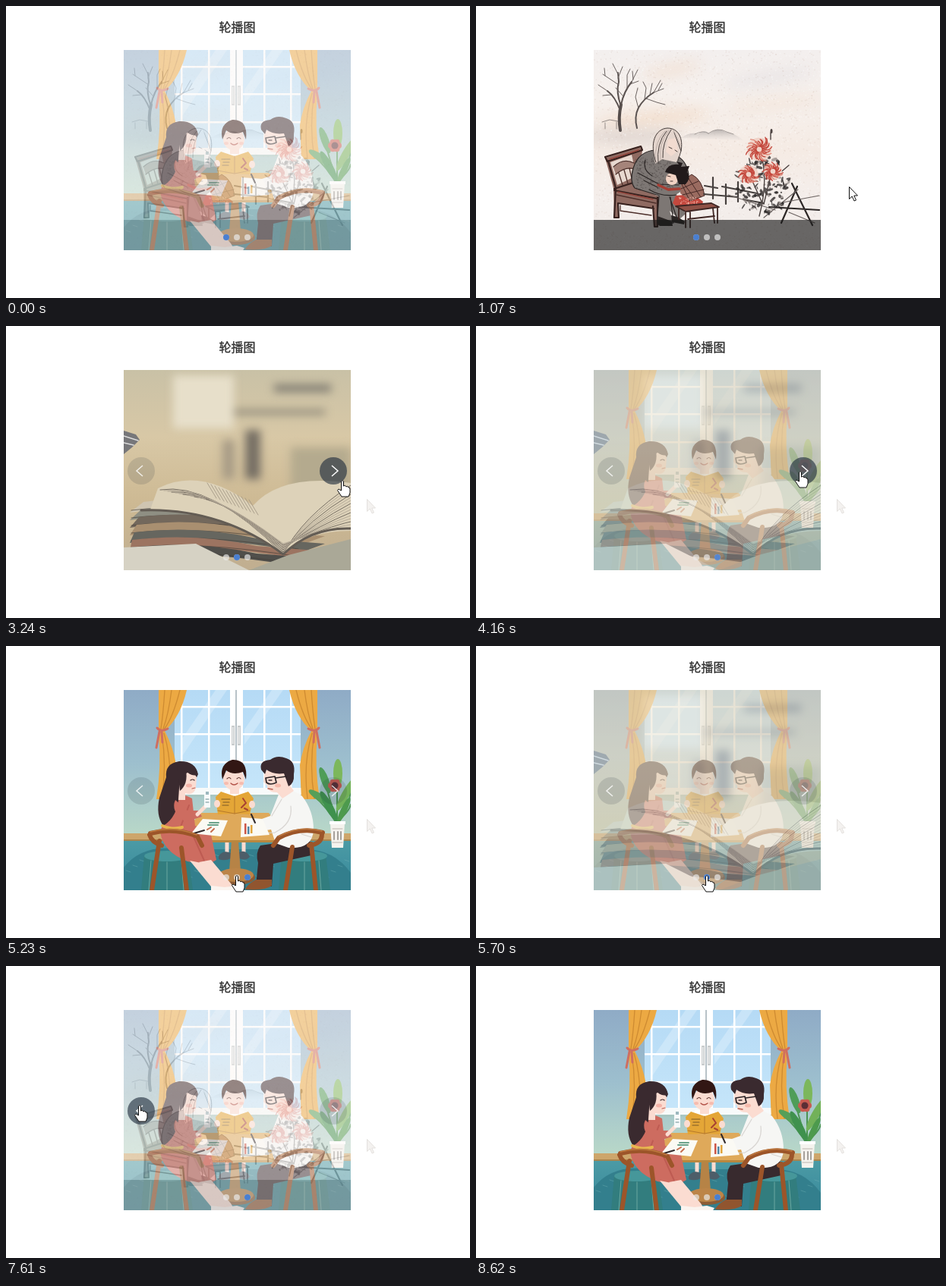
Animation, 611 px wide and 385 px high, one loop 9.32 s. Source, as an HTML page with a canvas:

```html
<!DOCTYPE html>
<html lang="zh-CN">
<head>
<meta charset="utf-8">
<title>轮播图</title>
<style>
html, body { margin: 0; width: 100%; height: 100%; overflow: hidden; background: #fff; }
canvas { position: absolute; left: 0; top: 0; }
h1 { position: absolute; left: 0; top: 15px; width: 609px; margin: 0; text-align: center;
  font: 500 16px/24px "Noto Sans CJK SC", "Noto Sans CJK", sans-serif; color: #333; -webkit-text-stroke: .35px #333; }
</style>
</head>
<body>
<canvas id="stage" width="611" height="385"></canvas>
<h1>轮播图</h1>
<script>
const LOOP = 9320, FADE = 500;
const BOX = { x: 155, y: 58, w: 299, h: 264 };
const ctx = document.getElementById('stage').getContext('2d');

function seeded(seed) {
  return () => (seed = (seed * 16807) % 2147483647) / 2147483647;
}

// Builds one slide; painters work in stage coordinates.
function makeSlide(paint) {
  const canvas = document.createElement('canvas');
  canvas.width = BOX.w;
  canvas.height = BOX.h;
  const c = canvas.getContext('2d');
  c.translate(-BOX.x, -BOX.y);
  c.lineCap = c.lineJoin = 'round';
  paint({
    c,
    fill(color, d) { c.fillStyle = color; c.fill(new Path2D(d)); },
    line(color, width, d) { c.strokeStyle = color; c.lineWidth = width; c.stroke(new Path2D(d)); },
    rect(color, x, y, w, h) { c.fillStyle = color; c.fillRect(x, y, w, h); },
    oval(color, x, y, rx, ry = rx, turn = 0) {
      c.fillStyle = color;
      c.beginPath();
      c.ellipse(x, y, rx, ry, turn, 0, 7);
      c.fill();
    },
    fade(y0, y1, ...colors) {
      const g = c.createLinearGradient(0, y0, 0, y1);
      colors.forEach((color, i) => g.addColorStop(i / (colors.length - 1), color));
      return g;
    }
  });
  return canvas;
}

function paintInk({ c, fill, line, rect, oval, fade }) {
  const rnd = seeded(17), ink = '#2a2524';
  rect(fade(58, 322, '#f3efee', '#f6f0ec', '#f5ebe4', '#f4eeeb', '#f1ebe8'), 155, 58, 299, 264);
  c.filter = 'blur(9px)';
  oval('rgba(240,208,180,.5)', 235, 148, 75, 9, -.1);
  oval('rgba(240,212,190,.5)', 258, 84, 40, 7, -.2);
  oval('rgba(240,215,195,.45)', 395, 128, 65, 6, -.1);
  oval('rgba(226,222,226,.6)', 385, 95, 60, 8, -.15);
  oval('rgba(205,196,192,.6)', 205, 172, 65, 8);
  c.filter = 'none';
  for (let i = 0; i < 2600; i++) {
    rect(i % 2 ? 'rgba(170,140,125,.12)' : 'rgba(255,255,255,.35)', 155 + rnd() * 299, 58 + rnd() * 264, 1.5, 1.5);
  }
  // hills
  fill(fade(161, 180, '#aaa4a2', 'rgba(235,228,224,0)'), 'M270 174Q283 165 292 169Q301 162 307 168Q318 159 328 166Q340 167 352 177Z');
  line('#a39c99', 1, 'M288 169Q300 163 306 168M306 168Q318 159 330 166L339 169');
  line('#958c88', 1, 'M166 153L176 150L187 152M170 154V162M185 153V162');
  // bare trees
  line('#544c4a', 4, 'M190 164Q187 147 191 130');
  line('#5a5250', 2, 'M191 132Q184 113 188 100L187 88M190 138Q183 119 173 112M191 130Q195 112 205 100M212 161Q208 146 214 134Q221 122 234 114');
  line('#6b6361', 1, 'M187 90L180 76M187 95L193 80M188 104L176 96L167 90M173 112L161 104M178 117L167 118M205 100L213 84M199 109V91L203 83M203 103L214 99M194 119L184 108M170 92L169 82M207 97L206 86');
  line('#6b6361', 1, 'M214 135L210 120L213 108M222 123L224 108L220 100M234 114L243 98M234 114L247 109M224 122L238 127L249 130M229 117L232 102M240 111L245 102');
  // chair
  fill('#8f6a61', 'M170 200L215 185L219 191L212 237L242 252L240 291L235 291L233 267L188 261L188 280L182 280L181 240Z');
  fill('#e8d9d0', 'M177 206L205 196L211 224L186 236Z');
  fill('#a5847a', 'M181 213Q192 201 208 207L209 215Q194 211 184 222Z');
  line('#37211e', 2.2, 'M170 199L217 185L219 190L173 205ZM174 204L184 240L182 279L188 279L187 260M182 241L210 232M182 243L239 254M187 260L234 267M239 252V291H235L233 264');
  line('#4d302b', 1.3, 'M181 212Q194 200 208 207M184 222Q197 211 209 215M188 220L193 236M195 216L200 234M202 214L206 231M185 249L237 260M190 263V270L231 276');
  line('#96463d', 1.4, 'M187 245L233 255M176 202L214 190');
  // grandmother
  fill('#7d7774', 'M237 190Q214 191 207 214Q202 231 209 240L241 250L239 278L249 288L260 286L255 270L268 281L276 274L263 249L280 238Q284 208 263 197Z');
  for (let i = 0; i < 260; i++) oval('rgba(45,40,40,.28)', 210 + rnd() * 50, 200 + rnd() * 43, .8);
  line(ink, 1.2, 'M237 190Q214 191 207 214Q202 231 209 240L241 250L239 278L249 288L260 286L256 252M213 220L241 235L267 236M223 203Q219 216 232 224M263 197Q277 203 280 222M228 242Q244 252 264 249M255 252L264 278M221 230L239 239');
  fill(ink, 'M239 277Q236 288 242 290L259 290L258 284Z');
  fill(ink, 'M257 276L265 278L275 284L274 288L258 285Z');
  fill('#e4d5cd', 'M234 196C230 178 234 163 251 161C268 160 273 174 270 190L264 206L245 202L236 208Z');
  fill('#f2dbd0', 'M253 176L263 174L266 191L257 198L250 192Z');
  line('#443c3a', 1, 'M237 206C228 181 236 162 252 161C267 161 273 175 270 191L266 204M251 165Q237 181 240 208M257 163Q245 180 246 200M261 167L270 191M254 186L258 188M262 190L265 192');
  line('#a89b95', .7, 'M249 165Q234 180 237 202M254 164Q240 181 243 204M260 164L269 184');
  // child on the stool
  fill('#c4483e', 'M263 250L286 248L299 258L297 264L266 266L259 260Z');
  fill('#9a6b60', 'M270 232L284 222Q298 229 301 250L282 257L269 247Z');
  line('#472a27', 1, 'M272 232L289 255M279 226L296 252M270 241L293 231M272 249L300 242M270 232L284 222Q298 229 301 250L282 257Z');
  for (let i = 0; i < 40; i++) oval('rgba(245,190,175,.7)', 265 + rnd() * 27, 252 + rnd() * 10, .8);
  oval('#f2d3c4', 258, 228, 8, 8);
  fill('#211a1b', 'M249 219Q253 207 267 209L264 205L272 207L270 212L281 211L278 219Q284 226 276 235L267 235L263 223Z');
  line('#43312e', 1, 'M252 224L256 225M256 231L259 231');
  line('#a63e34', 3.5, 'M240 236L253 242L268 241');
  fill('#8f5146', 'M263 264L310 260L320 265L276 271Z');
  line('#3f2623', 1.8, 'M263 264L310 260L320 265L276 271ZM276 271V292M282 272V292M312 267L314 286M318 266V286M267 266V282M279 281L314 277');
  // fence
  line('#46403e', 2.2, 'M301 237L318 240M324 238L370 247M300 248L345 252M312 226V254M329 235V261M345 232V258M352 255L379 260');
  line('#2c2726', 2.2, 'M416 234L443 289M423 238L402 286M386 265L452 269');
  line('#6b6361', 1.2, 'M379 279L424 242M404 259L452 250M332 249L394 269M412 272L446 286');
  // leaves and blossoms
  for (let i = 0; i < 150; i++) {
    const a = rnd() * 6.3, r = Math.sqrt(rnd());
    oval(i % 3 ? 'rgba(40,36,36,.75)' : 'rgba(120,112,109,.6)', 377 + Math.cos(a) * 36 * r, 236 + Math.sin(a) * 40 * r,
      1 + rnd() * 3.4, .6 + rnd() * 1.6, rnd() * 3);
  }
  line('#4b4240', 1.4, 'M374 191Q386 227 373 277M360 222L377 260M390 216L379 261M388 176L388 167M398 222L412 210');
  oval('#4b4240', 389, 165, 1.5, 3);
  for (const [x, y, rx, ry] of [[373, 189, 19, 18], [359, 222, 15, 14], [391, 218, 14, 13]]) {
    oval('#f0d3c8', x, y, rx * .85, ry * .85);
    for (let i = 0; i < 34; i++) {
      const a = i * 2.4, s = .5 + rnd() * .5, bend = a + .5;
      line(i % 4 ? '#c3463b' : '#dd8474', 1.3,
        `M${x + Math.cos(a) * 4} ${y + Math.sin(a) * 4}Q${x + Math.cos(bend) * rx * s * .8} ${y + Math.sin(bend) * ry * s * .8} ${x + Math.cos(a) * rx * s} ${y + Math.sin(a) * ry * s}`);
    }
  }
  rect('rgba(25,25,25,.63)', 155, 282, 299, 40);
}

function paintBooks({ c, fill, line, rect, oval, fade }) {
  rect(fade(58, 322, '#c9c1a6', '#d8c8a6', '#cdb993', '#c0ae90'), 155, 58, 299, 264);
  c.filter = 'blur(6px)';
  rect('#817d72', 353, 77, 75, 10);
  rect('#908a7a', 285, 110, 135, 7);
  rect('#766f64', 315, 137, 20, 65);
  rect('#a79b85', 285, 150, 16, 52);
  rect('#e7dfca', 220, 65, 80, 70);
  rect('#b4aa8e', 375, 160, 79, 60);
  c.filter = 'none';
  fill('#77777a', 'M155 138L171 143L176 150L166 160L155 169Z');
  line('#ddd', 1.5, 'M155 145L174 151M155 154L168 157');
  // stacked volumes
  const layers = ['#cfc5b1', '#8f8f83', '#73685c', '#a98f70', '#66665f', '#9c7461', '#504f4b'];
  layers.forEach((color, i) => {
    const y = 232 + i * 10;
    fill(color, `M${181 - i * 3} ${y}Q250 ${y - 10} 330 ${y + 8}L420 ${y + 15}L390 ${y + 26}Q250 ${y + 1} 163 ${y + 14}Z`);
    line('rgba(65,60,55,.65)', 1, `M165 ${y + 11}Q250 ${y} 385 ${y + 22}`);
  });
  // open pages
  fill('#ddd2b9', 'M200 214Q258 185 325 237Q363 194 454 207V270Q393 270 365 302Q289 245 190 242Z');
  for (let i = 0; i < 15; i++) {
    line(i % 3 ? '#b5aa98' : '#756d62', 1,
      `M${203 + i * 5} ${216 + i}Q${270 + i * 3} ${205 + i * 3} 365 ${301 - i}Q${390 + i * 3} ${252 + i} 454 ${210 + i * 4}`);
  }
  line('#635c54', 3, 'M178 243Q282 239 365 301Q402 265 454 267');
  for (let i = 0; i < 12; i++) line('#9f9482', .8, `M${265 + i * 5} ${207 + i * 2}l12 20`);
  fill('#d6d2c4', 'M155 292L250 287L320 322H155Z');
  fill('#aaa897', 'M320 322L372 302L454 281V322Z');
}

function paintFamily({ c, fill, line, rect, oval, fade }) {
  const hair = '#3a2a2f', skin = '#fbdcd1', wood = '#9c5529';
  rect(fade(58, 250, '#8fabc6', '#9dbfce', '#b9d8c8'), 155, 58, 299, 192);
  rect('#cda66b', 155, 247, 299, 9);
  rect('#a9854e', 155, 255, 299, 2);
  rect(fade(257, 322, '#4b9aa5', '#38899a'), 155, 257, 299, 65);
  fill('#337f8d', 'M155 292Q180 260 230 268L390 268Q430 266 454 299V322H155Z');
  for (let x = 158; x < 454; x += 9) line('rgba(120,185,187,.35)', 1, `M${x} ${275 + x % 5 * 7}l6 2`);
  // window
  rect(fade(58, 195, '#b5daf5', '#c6e6fa'), 222, 58, 166, 137);
  fill('rgba(255,255,255,.25)', 'M276 58H291L232 145V122Z');
  fill('rgba(255,255,255,.25)', 'M350 58H365L314 130V110Z');
  for (const x of [230, 266, 339, 374]) rect('#fff', x, 58, 2.5, 135);
  for (const y of [79, 115, 152]) rect('#fff', 222, y, 166, 2.5);
  rect('#fff', 295, 58, 17, 137);
  rect('#b8c2c8', 302, 58, 2, 137);
  for (const x of [297, 305]) {
    rect('#c9cccd', x, 105, 4, 26);
    rect('#eceeee', x + 1, 107, 1.5, 22);
  }
  rect('#f7fafa', 216, 187, 178, 9);
  rect('#a8c7c2', 216, 196, 178, 3);
  // curtains, the right one mirrored
  for (const side of [1, -1]) {
    c.save();
    if (side < 0) { c.translate(611, 0); c.scale(-1, 1); }
    fill('#eca943', 'M201 58H238Q230 93 209 112Q221 135 224 157L222 202H198Q205 158 201 116Z');
    line('#ce8b32', 1.3, 'M209 58Q207 90 204 109M218 58Q214 90 207 109M229 58Q220 94 208 110M205 115Q212 158 205 201M208 115Q220 155 214 201');
    line('#cf6e60', 3, 'M199 108Q204 114 213 109M202 113L198 134M205 113L206 127');
    c.restore();
  }
  // plant
  line('#4b9453', 2, 'M436 236V164M436 235Q421 211 407 199M437 235Q452 210 454 190M436 235Q421 184 418 171M437 231Q452 218 454 209');
  for (const [x, y, rx, ry, turn, color] of [
    [437, 168, 6, 19, 0, '#7cb75b'], [420, 177, 5, 18, -.35, '#4f9d58'], [447, 196, 5, 24, .5, '#72b159'],
    [414, 200, 5, 18, -1, '#569f58'], [425, 211, 5, 22, -.5, '#3f914e'], [445, 216, 4, 18, .45, '#4d9a4d']
  ]) oval(color, x, y, rx, ry, turn);
  for (let i = 0; i < 6; i++) oval('#c85c51', 433 + Math.cos(i * 1.05) * 5, 184 + Math.sin(i * 1.05) * 5, 4);
  oval('#5b2e35', 433, 184, 4.5);
  fill('#f5f3ee', 'M427 233H446L444 266H429Z');
  rect('#fff', 426, 231, 21, 4);
  line('#bbb4ad', 1, 'M430 241H443M430 259H443');
  line('#a5a19b', 2, 'M432 245V255M437 245V255M441 245V255');
  // stools
  for (const x of [212, 393]) {
    fill('#327d7e', `M${x - 30} 276L${x - 34} 322H${x + 34}L${x + 28} 276Z`);
    oval('#46979a', x, 277, 30, 7);
    line('#6ba8a0', 1, `M${x - 21} 283L${x - 24} 322M${x + 19} 283L${x + 22} 322M${x} 285V322`);
  }
  // boy
  fill('#fff', 'M281 199L289 190H312L323 199L319 242H282Z');
  fill(skin, 'M295 184H307V195H295Z');
  oval(skin, 300, 176, 14, 14);
  fill('#321714', 'M285 176Q281 159 293 152L298 150Q319 149 316 176L312 166Q299 171 290 164Z');
  line('#5c322d', 1.1, 'M291 175Q294 172 296 175M304 175Q307 172 309 175');
  line('#b4544a', 1.4, 'M296 181Q300 185 305 181');
  oval('rgba(240,140,125,.4)', 290, 181, 3, 2);
  oval('rgba(240,140,125,.4)', 310, 181, 3, 2);
  // table and the boy's feet
  line(skin, 5, 'M291 258V271M313 258V271');
  fill('#4d5e69', 'M280 277Q286 268 296 273V280Q288 284 280 281Z');
  fill('#4d5e69', 'M307 272Q316 268 321 278Q316 284 307 280Z');
  fill('#b68346', 'M297 257H306L309 297H294Z');
  oval('#8d5c35', 303, 305, 25, 10);
  oval('#bc8548', 303, 302, 23, 9);
  fill('#dfa95a', 'M256 220H346L373 254V259H228V254Z');
  rect('#b9873f', 228, 256, 145, 3);
  fill('#e4a637', 'M276 199L283 192L301 198L319 192L326 201L321 222L302 221L279 222Z');
  line('#b5782c', 1, 'M301 198V221M279 217L301 221L321 217');
  line('#a84232', 2, 'M312 201L316 207L310 213M314 214L318 216');
  line('#785928', 1.2, 'M284 202H295M286 206H294M285 210H293');
  oval(skin, 278, 208, 4, 5);
  oval(skin, 324, 209, 4, 5);
  // mother
  fill('#cd6c60', 'M219 200Q232 193 245 201L249 237L269 244L277 282L265 289L239 284Q207 272 203 245Z');
  line('#be5b52', 2, 'M241 210L230 238M245 247L261 283');
  fill(hair, 'M211 173Q209 155 228 152Q249 151 253 169L248 180Q226 181 228 196Q226 226 207 237Q197 223 202 200Z');
  fill(skin, 'M229 172L245 164L251 173L250 187Q247 198 236 194L236 203L227 203Z');
  fill(hair, 'M225 157Q251 151 252 170Q242 172 237 164Q240 182 229 191Z');
  line('#412e32', 1.2, 'M243 177Q246 175 248 177');
  line('#bd6056', 1.2, 'M245 188L249 187');
  oval('rgba(236,129,117,.45)', 241, 184, 4, 2.5);
  fill('#cd6c60', 'M223 203Q216 218 236 232L258 225L254 217L239 217Z');
  line(skin, 5, 'M252 222L264 210');
  line('#e8b64f', 4, 'M206 237Q220 243 232 239');
  fill(skin, 'M242 283L262 287L285 313L292 322H274Z');
  fill(skin, 'M254 285L270 282L296 313L299 318L286 321Z');
  fill('#faf4ef', 'M270 316L288 318L304 316L314 319L311 324H270Z');
  rect('#f8fafa', 261, 196, 8, 17);
  rect('#9cb7be', 263, 192, 4, 4);
  line('#668b91', 1, 'M263 202H267M263 206H267');
  // father
  fill('#382a2e', 'M335 263L396 254Q408 262 402 276L352 287L350 317H329L332 286Q328 273 335 263Z');
  fill('#91552f', 'M329 308H350V316Q341 323 315 321Q318 314 329 308Z');
  fill('#f6f6f4', 'M360 193Q378 187 390 198Q405 217 405 242Q404 268 372 266L355 260L349 242L323 246L320 234L348 224Z');
  line('#d8d5d2', 1.2, 'M363 202L350 224M375 211Q378 234 354 246M354 246L334 247M389 248L402 252');
  line(skin, 6, 'M324 239L315 238M334 247L319 244');
  fill(skin, 'M341 166L348 160L371 166L374 184L379 191L364 201L357 193Q344 193 344 184L339 179Z');
  fill(hair, 'M336 163Q333 151 348 150Q357 143 369 148Q382 152 379 169Q380 181 372 185L366 168Q352 170 343 163L341 169Z');
  line('#2c2427', 1.7, 'M342 174L354 172L356 180Q348 184 343 180ZM355 174L369 172');
  line('#3b2b2d', 1.3, 'M346 177L350 177');
  line('#b75f52', 1.4, 'M345 188L351 189');
  oval('rgba(235,142,125,.45)', 358, 184, 4, 2.5);
  // papers and pens
  fill('#fbfaf4', 'M259 228L292 230L283 251L244 247Z');
  fill('#fbfaf4', 'M310 226L338 228L347 249L309 252Z');
  line('#6ca38c', 2, 'M268 233H280M266 236H279');
  line('#c66d4e', 2, 'M265 242L270 239M270 245L274 241');
  rect('#cc5648', 314, 234, 2.5, 14);
  rect('#4f87a8', 318, 238, 2.5, 10);
  rect('#e0a43b', 322, 236, 2.5, 11);
  line('#30292b', 2, 'M323 222L328 233M244 248L261 243');
  // chair frames
  line(wood, 6, 'M190 247Q222 239 252 251L258 263M189 249Q192 259 205 263M202 257L192 322M231 266L238 322');
  line(wood, 6, 'M417 246Q387 238 359 253L352 263M416 248Q416 261 399 263M402 261L408 322M377 265L368 322');
  line('#bf7a40', 1.4, 'M190 245Q222 237 251 249M416 244Q387 236 359 251');
}

const slides = { ink: makeSlide(paintInk), books: makeSlide(paintBooks), family: makeSlide(paintFamily) };
const order = ['ink', 'books', 'family'];
const changes = [
  [-250, 'family', 'ink'], [2660, 'ink', 'books'], [3980, 'books', 'family'],
  [5390, 'family', 'books'], [5930, 'books', 'ink'], [7360, 'ink', 'family']
];
// Pointer stops: time, x, y.
const stops = [
  [680, 479, 348], [1070, 491, 238], [1590, 491, 238], [1690, 477, 229], [1830, 476, 228],
  [2760, 476, 228], [3540, 427, 191], [4640, 427, 191], [5160, 304, 302], [5830, 304, 302],
  [5930, 289, 304], [6400, 286, 303], [6660, 286, 303], [6770, 278, 303], [6900, 278, 303],
  [7320, 176, 183], [7890, 176, 183], [8580, 588, 385]
];
const arrows = [{ x: 178, dir: -1 }, { x: 431, dir: 1 }];
const dots = [290, 304, 318], dotY = 305, arrowY = 191;
const arrowShape = new Path2D('M.5 .5V16.5L4.2 13L7 19L9.5 18L6.8 12H11.5Z');
const handShape = new Path2D('M-1.5 14V2Q0 -1 1.5 2V8Q4 6 5 9Q7 7 8 10Q10 9 10 12V17L8 22H-1L-5 16Q-8 13 -5 12Z');
const swing = p => .5 - Math.cos(Math.PI * p) / 2;
const near = (p, x, y, r) => Math.hypot(p.x - x, p.y - y) <= r;

function pointerAt(t) {
  const i = stops.findIndex(s => s[0] > t);
  if (i < 1) return null;
  const [t0, x0, y0] = stops[i - 1], [t1, x1, y1] = stops[i];
  const k = swing((t - t0) / (t1 - t0));
  return { x: x0 + (x1 - x0) * k, y: y0 + (y1 - y0) * k };
}

function drawPointer(x, y, shape, outline = '#111', inner = '#fff') {
  ctx.save();
  ctx.translate(Math.round(x), Math.round(y));
  ctx.fillStyle = inner;
  ctx.strokeStyle = outline;
  ctx.lineWidth = 1;
  ctx.fill(shape);
  ctx.stroke(shape);
  ctx.restore();
}

function disc(x, y, r, color) {
  ctx.fillStyle = color;
  ctx.beginPath();
  ctx.arc(x, y, r, 0, 7);
  ctx.fill();
}

function drawArrow({ x, dir }, hover) {
  disc(x, arrowY, 18, hover ? 'rgba(31,45,61,.62)' : 'rgba(31,45,61,.14)');
  ctx.strokeStyle = hover ? '#fff' : 'rgba(255,255,255,.8)';
  ctx.lineWidth = 1.5;
  ctx.beginPath();
  ctx.moveTo(x - 2 * dir, arrowY - 7);
  ctx.lineTo(x + 6 * dir, arrowY);
  ctx.lineTo(x - 2 * dir, arrowY + 7);
  ctx.stroke();
}

function render(t) {
  ctx.clearRect(0, 0, 611, 385);
  const [start, from, to] = changes.filter(c => c[0] <= t).pop();
  const k = swing(Math.min(1, (t - start) / FADE));
  for (const name of order) {
    ctx.globalAlpha = name === to ? k : name === from ? 1 - k : 0;
    ctx.drawImage(slides[name], BOX.x, BOX.y);
  }
  ctx.globalAlpha = 1;

  const p = pointerAt(t);
  const inside = p && p.x >= BOX.x && p.x < BOX.x + BOX.w && p.y >= BOX.y && p.y < BOX.y + BOX.h;
  if (inside) arrows.forEach(a => drawArrow(a, near(p, a.x, arrowY, 18)));
  dots.forEach(x => disc(x, dotY, 4, 'rgba(235,235,235,.68)'));
  ctx.globalAlpha = Math.min(1, (t - start) / 200);
  disc(dots[order.indexOf(to)], dotY, 4, '#4a7fd0');
  ctx.globalAlpha = 1;

  if (t > 2830) drawPointer(475, 228, arrowShape, '#e4e1de', '#f4f2f0');
  if (p) {
    const link = arrows.some(a => near(p, a.x, arrowY, 18)) || dots.some(x => near(p, x, dotY, 4));
    drawPointer(p.x, p.y, link ? handShape : arrowShape);
  }
}

const begin = performance.now();
function tick() {
  render((performance.now() - begin) % LOOP);
  requestAnimationFrame(tick);
}
tick();
</script>
</body>
</html>
```
